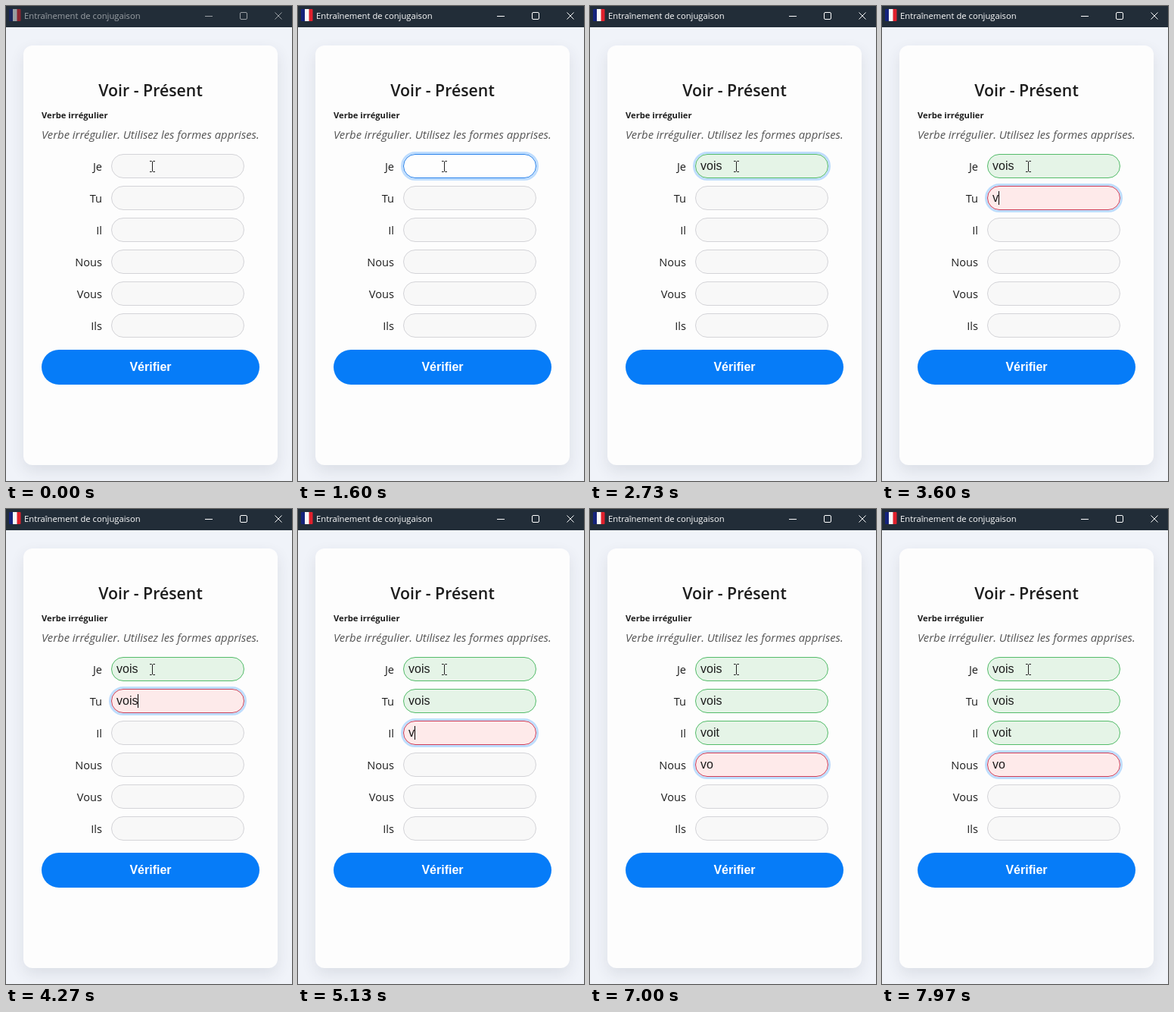
Write an HTML page that moves like this. It is 378 px wide and 626 px high and loops after 8000 ms.

```html
<!DOCTYPE html>
<html lang="fr">
<head>
<meta charset="utf-8">
<title>Entraînement de conjugaison</title>
<style>
  html, body { margin: 0; width: 100%; height: 100%; overflow: hidden; background: #f0f3f9; }
  svg { display: block; font-family: "Open Sans", "Noto Sans", sans-serif; fill: #1c1c1c; }
  .arial { font: 16px "Liberation Sans", Arial, sans-serif; }
  .label { font-size: 14.6px; font-weight: 500; text-anchor: end; }
</style>
</head>
<body>
<svg width="378" height="626" viewBox="0 0 378 626">
  <defs>
    <filter id="soft" x="-20%" y="-20%" width="140%" height="140%"><feGaussianBlur stdDeviation="10"/></filter>
  </defs>
  <rect width="378" height="626" fill="#f0f3f9"/>
  <rect x="23" y="60" width="336" height="553" rx="12" fill="#20283c" opacity=".1" filter="url(#soft)"/>
  <rect x="23" y="52" width="336" height="553" rx="12" fill="#fdfdfd"/>

  <rect width="378" height="28" fill="#222d38"/>
  <g id="bar">
    <rect x="4" y="4" width="5.5" height="16" rx="1" fill="#14237c"/>
    <rect x="14" y="4" width="5.5" height="16" rx="1" fill="#e0202c"/>
    <rect x="9" y="4" width="5.5" height="16" fill="#f8f8f8"/>
    <text x="24" y="17" font-size="11.25" fill="#fff">Entraînement de conjugaison</text>
    <g fill="none" stroke="#fff">
      <path d="M263 13.5h10M355.500 8.500l9 9m0-9l-9 9"/>
      <rect x="309.500" y="8.500" width="9" height="9" rx="1.500"/>
    </g>
  </g>

  <text x="191" y="119" font-size="21.3" font-weight="600" text-anchor="middle">Voir - Présent</text>
  <text x="47" y="148" font-size="11.2" font-weight="700">Verbe irrégulier</text>
  <text x="47" y="175" font-size="14.86" font-style="italic" fill="#555">Verbe irrégulier. Utilisez les formes apprises.</text>
  <g id="form"></g>
  <rect x="47" y="453" width="288" height="46" rx="23" fill="#067cf8"/>
  <text class="arial" x="191" y="481" text-anchor="middle" style="font-weight:700" fill="#fff">Vérifier</text>
  <path d="M190 204.500h2.500l1 1 1-1h2.500M193.500 205v13M190 218.500h2.500l1-1 1 1h2.500" fill="none" stroke="#222"/>
</svg>
<script>
const LOOP = 8000, CLICK = 340, BLINK = 530, FADE = 200;
const bar = document.getElementById("bar");
const form = document.getElementById("form");

// Fill and border of a field in each state
const LOOK = {
  idle:  [[248, 248, 248], [212, 212, 216]],
  focus: [[254, 254, 254], [40, 130, 235]],
  bad:   [[254, 234, 234], [208, 62, 88]],
  good:  [[229, 244, 231], [84, 188, 106]]
};

// Keystroke times for each answer
const ROWS = [
  { who: "Je", word: "vois", focus: CLICK, blur: 3070, keys: [1640, 1820, 2000, 2200], once: true },
  { who: "Tu", word: "vois", focus: 3070, blur: 4670, keys: [3340, 3620, 3930, 4250] },
  { who: "Il", word: "voit", focus: 4670, blur: 5840, keys: [4900, 5240, 5400, 5560] },
  { who: "Nous", word: "voyons", focus: 5840, blur: LOOP, keys: [6170, 6350] },
  { who: "Vous" },
  { who: "Ils" }
];

function add(tag, attrs, text = "") {
  const el = document.createElementNS("http://www.w3.org/2000/svg", tag);
  for (const name in attrs) el.setAttribute(name, attrs[name]);
  el.textContent = text;
  return form.appendChild(el);
}

const set = (el, name, value) => el.setAttribute(name, value);
const clamp = x => Math.max(0, Math.min(1, x));
const smooth = x => x * x * (3 - 2 * x);
const mix = (a, b, k) => `rgb(${a.map((v, i) => Math.round(v + (b[i] - v) * k))})`;

ROWS.forEach((row, i) => {
  const y = 195 + 42 * i;
  add("text", { class: "label", x: 127, y: y + 22 }, row.who);
  row.glow = add("rect", { x: 137.5, y: y - 1.5, width: 179, height: 35, rx: 17.5, fill: "none", stroke: "#007bff", "stroke-width": 3 });
  row.box = add("rect", { x: 139.5, y: y + .5, width: 175, height: 31, rx: 15.5 });
  row.text = add("text", { class: "arial", x: 146, y: y + 21 });
  row.caret = add("rect", { y: y + 7, width: 1, height: 18, fill: "#000" });

  row.steps = [[-FADE, "idle"]];
  if (row.keys) {
    row.steps.push([row.focus, "focus"], [row.keys[0], "bad"]);
    if (row.keys.length === row.word.length) row.steps.push([row.keys.at(-1), "good"]);
  }
});

function drawRow(row, t) {
  const past = row.steps.filter(step => step[0] <= t);
  const [start, state] = past.at(-1);
  const from = LOOK[past.length > 1 ? past.at(-2)[1] : "idle"];
  const k = smooth(clamp((t - start) / FADE));
  set(row.box, "fill", mix(from[0], LOOK[state][0], k));
  set(row.box, "stroke", mix(from[1], LOOK[state][1], k));

  const active = t >= row.focus && t < row.blur;
  const glow = row.keys ? clamp((t - row.focus) / 60) - clamp((t - row.blur) / 90) : 0;
  set(row.glow, "opacity", .25 * glow);

  const typed = row.keys ? row.keys.filter(key => key <= t) : [];
  row.text.textContent = (row.word || "").slice(0, typed.length);
  const rest = t - (typed.at(-1) ?? row.focus);
  const lit = row.once ? rest < BLINK : rest % (2 * BLINK) < BLINK;
  set(row.caret, "opacity", active && lit ? 1 : 0);
  if (active) set(row.caret, "x", Math.round(146 + row.text.getComputedTextLength()));
}

function draw() {
  const t = performance.now() % LOOP;
  set(bar, "opacity", t < CLICK ? .55 : 1);
  ROWS.forEach(row => drawRow(row, t));
  requestAnimationFrame(draw);
}

draw();
</script>
</body>
</html>
```
